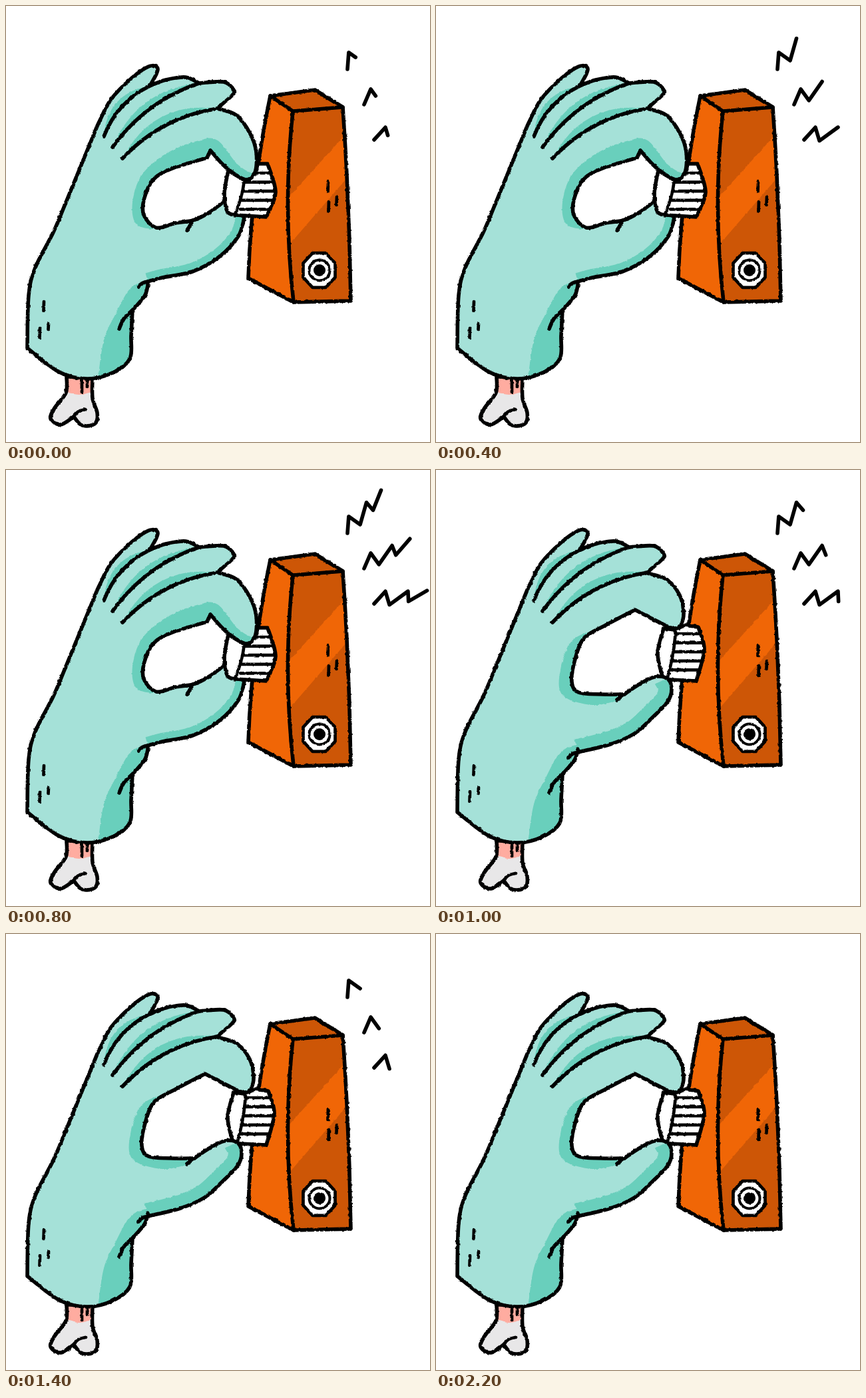
Write an HTML page that moves like this. It is 637 by 655 pixels and loops after 2.4 s.

```html
<!DOCTYPE html>
<html lang="en">
<head>
<meta charset="utf-8">
<title>Turning the knob</title>
<style>
  html, body { margin: 0; width: 100%; height: 100%; overflow: hidden; background: #fff; }
  svg { display: block; width: 100%; height: 100%; }
  .ink { fill: none; stroke: #000; stroke-width: 5.6; stroke-linecap: round; stroke-linejoin: round; }
  .thin { stroke-width: 4.7; }
</style>
</head>
<body>
<svg id="stage" viewBox="0 0 637 655"></svg>
<script>
const STEP = 200, LOOP = 2400, PEAK = 4;
const TEAL = '#a5e1d8', DEEP_TEAL = '#69cfbc', ORANGE = '#f06606', DEEP_ORANGE = '#cd5606';
const BONE = '#e8e7e8', FLESH = '#ffaca0';

const range = n => [...Array(n).keys()];
const ink = (d, extra = '') => `<path class="ink ${extra}" d="${d}"/>`;
const fill = (d, color) => `<path d="${d}Z" fill="${color}"/>`;
const line = (...points) => 'M' + points.join('L');

// Smooth curve through "x,y" points; a bar separates runs that meet at a corner.
function spline(text) {
  return text.split('|').map((run, r) => {
    const p = run.trim().split(' ').map(q => q.split(',').map(Number));
    const handle = (at, from, to, sign) => at.map((v, k) => v + sign * (to[k] - from[k]) / 6);
    return (r ? 'L' : 'M') + p[0] + p.slice(1).map((c, i) => {
      const b = p[i], before = p[i - 1] || b, after = p[i + 2] || c;
      return 'C' + [handle(b, before, c, 1), handle(c, b, after, -1), c].join(' ');
    }).join('');
  }).join('');
}

// Curve segment from a to b whose middle bulges to the left of travel.
function bow(a, b, bulge) {
  const dx = b[0] - a[0], dy = b[1] - a[1], k = 2 * bulge / Math.hypot(dx, dy);
  return `Q${(a[0] + b[0]) / 2 + dy * k},${(a[1] + b[1]) / 2 - dx * k} ${b}`;
}

const fingers = [
  { root: [147, 196], tip: [216, 120], bulge: 10, shade: 10 },
  { root: [160, 212], tip: [290, 116], bulge: 13, shade: 11 },
  { root: [175, 229], tip: [318, 154], bulge: 14, shade: 14 }
];
const knuckles = '32,514 34,435 44,393 71,340 90,295 131,195 140,174 158,140 188,109 214,91 227,92 226,102 216,120' +
  '|216,120 240,111 270,107 290,116|290,116 327,114 342,126 340,134 318,153|';
const cuff = '|213,420 208,436 190,457|190,457 188,495 186,530 160,551 122,560 80,550 32,514';
const cuffShade = '213,412 187,424 165,462 147,502 138,562|200,562|230,420';

const poses = [
  {
    index: '318,154 346,164 367,192 376,220 374,250 360,261 331,243 307,217|307,217 302,228' +
      '|302,228 250,244 222,260 208,288 207,314 226,333 255,326 281,322 304,311 330,292|',
    thumb: '358,318 349,346 320,377 280,399 235,408 213,414',
    thumbShade: 13, crease: line([281, 322], [272, 337]),
    palmShade: '374,254 348,238 318,202 290,202 240,222 204,254 190,295 196,328 228,336|260,290|300,236|360,264',
    knob: '334,247 328,282 333,309 345,314|391,317|391,317 405,280 393,237|378,237 374,252 360,261 334,247',
    rim: [[358, 262], [344, 313]], ribTop: 251
  },
  {
    index: '318,155 346,164 365,186 372,212 368,232 357,238 336,229 299,210' +
      '|299,210 255,233 222,253 208,288 204,318 214,334 250,337 283,337|283,337 305,322 328,311 ',
    thumb: '347,313 354,328 348,348 325,372 298,396 262,412 213,424',
    thumbShade: 20, crease: line([283, 337], [272, 345]),
    palmShade: '248,237 205,256 187,300 190,338 235,353 278,345|225,300',
    knob: '342,238 333,275 340,310|352,315|391,317|391,317 403,270 394,236|375,233|358,240',
    rim: [[360, 241], [348, 311]], ribTop: 246
  }
];

function drawBone() {
  const shape = spline('91,557 90,581 73,604 67,620 82,629 102,617|102,617 111,628 122,631 135,626 137,611 130,589 130,557');
  const flesh = spline('91,557|130,557|128,580 110,584 92,580');
  return fill(shape, BONE) + fill(flesh, FLESH) + ink(shape + 'Z') +
    ink(spline('119,606 109,609 101,617') + 'M114,564v16M122,564v8', 'thin');
}

function drawBox() {
  const back = [397, 135], far = [464, 126], right = [506, 152], ridge = [431, 158];
  const foot = [518, 443], ridgeFoot = [432, 445], leftFoot = [364, 409];
  const rightEdge = bow(right, foot, 2);
  const body = line(back, far, right) + rightEdge + 'L' + ridgeFoot + 'L' + leftFoot + bow(leftFoot, back, 6);
  const side = line(ridge, right) + rightEdge + 'L' + ridgeFoot + bow(ridgeFoot, ridge, 8);
  return fill(body, ORANGE) + fill(line(back, far, right, ridge), DEEP_ORANGE) + fill(side, DEEP_ORANGE) +
    fill(line([509, 194], [424, 288], [426, 358], [511, 260]), ORANGE) +
    ink(body + 'Z') + ink(line(back, ridge, right)) + ink('M' + ridge + bow(ridge, ridgeFoot, -8));
}

function drawSocket() {
  const corners = range(8).map(i => {
    const a = (i + 0.5) * Math.PI / 4;
    return [470.5 + 26 * Math.cos(a), 397 + 28 * Math.sin(a)];
  });
  const disc = (r, color, width) => `<circle cx="471" cy="397" r="${r}" fill="${color}" stroke="#000" stroke-width="${width}"/>`;
  return fill(line(...corners), '#fff') + ink(line(...corners) + 'Z', 'thin') + disc(15.5, '#fff', 4) + disc(9, '#000', 0);
}

function drawHand(pose, id) {
  const shape = spline(knuckles + pose.index + pose.thumb + cuff);
  const crease = f => 'M' + f.root + bow(f.root, f.tip, f.bulge);
  const shade = f => crease(f) + bow(f.tip, f.root, -f.bulge - f.shade);
  const shades = fingers.map(f => fill(shade(f), DEEP_TEAL)).join('') +
    fill(spline(pose.palmShade), DEEP_TEAL) + fill(spline(cuffShade), DEEP_TEAL) +
    `<path d="${spline(pose.thumb)}" fill="none" stroke="${DEEP_TEAL}" stroke-width="${2 * pose.thumbShade}"/>`;
  const thumbEnd = pose.thumb.split(' ').pop();
  return `<clipPath id="hand${id}"><path d="${shape}Z"/></clipPath>` + fill(shape, TEAL) +
    `<g clip-path="url(#hand${id})">${shades}</g>` + ink(shape + 'Z') +
    ink(fingers.map(crease).join('') + pose.crease + `M${thumbEnd}q-9,1 -14,8` + spline('190,457 177,470 170,485'));
}

function drawKnob(pose, id) {
  const shape = spline(pose.knob), [top, bottom] = pose.rim;
  const ribs = range(5).map(i => {
    const y = pose.ribTop + 13.6 * i;
    return `M${360 - (y - 250) * 0.14},${y}H410`;
  }).join('');
  return `<clipPath id="knob${id}"><path d="${shape}Z"/></clipPath>` + fill(shape, '#fff') +
    `<g clip-path="url(#knob${id})">${ink(ribs, 'thin')}</g>` +
    ink('M' + top + bow(top, bottom, 2), 'thin') + ink(shape + 'Z');
}

// Short upright ticks: x, top, length.
function drawTicks() {
  const ticks = [[57, 444, 14], [64, 477, 9], [51, 484, 14], [484, 263, 16], [485, 294, 15], [497, 287, 12]];
  return ink(ticks.map(([x, y, length]) => `M${x},${y}l-.5,${length}`).join(''), 'thin');
}

const roughen = id => `<filter id="rough${id}" filterUnits="userSpaceOnUse" x="0" y="0" width="637" height="655"
    color-interpolation-filters="sRGB">
  <feTurbulence type="fractalNoise" baseFrequency="0.2" numOctaves="2" seed="${id + 4}"/>
  <feDisplacementMap in="SourceGraphic" scale="3" xChannelSelector="R" yChannelSelector="G"/></filter>`;

const drawPose = (pose, id) => roughen(id) + `<g class="pose" filter="url(#rough${id})">` +
  drawBone() + drawBox() + drawSocket() + drawHand(pose, id) + drawKnob(pose, id) + drawTicks() + '</g>';

// One zigzag, as distance along and across its heading, fanned out three times.
const zigzag = [[0, 0], [21, 14], [22, -7], [54, 6], [51, -9], [82, 0]];

function sparkPath(i, segments) {
  const angle = (52 - 19 * i) * Math.PI / 180, cos = Math.cos(angle), sin = Math.sin(angle);
  const whole = Math.floor(segments), rest = segments - whole;
  const shown = zigzag.slice(0, whole + 1);
  if (rest) shown.push(zigzag[whole].map((v, k) => v + (zigzag[whole + 1][k] - v) * rest));
  const x = 513 + 30 * i - 5 * i * i, y = 95 + 53 * i;
  return line(...shown.map(([u, v]) => [x + u * cos - v * sin, y - u * sin - v * cos]));
}

const stage = document.getElementById('stage');
stage.innerHTML = poses.map(drawPose).join('') + '<path id="sparks" class="ink"/>';
const poseGroups = [...stage.querySelectorAll('.pose')];
const sparks = document.getElementById('sparks');

function render(time) {
  const step = Math.floor((time % LOOP) / STEP);
  poseGroups.forEach((g, i) => g.setAttribute('display', i === step % 2 ? 'inline' : 'none'));
  const away = Math.abs(step - PEAK);
  const segments = Math.max(1.6, 5 - away);
  sparks.setAttribute('d', away > PEAK ? '' : range(3).map(i => sparkPath(i, segments)).join(''));
}

const start = performance.now();
function tick() {
  render(performance.now() - start);
  requestAnimationFrame(tick);
}
tick();
</script>
</body>
</html>
```
